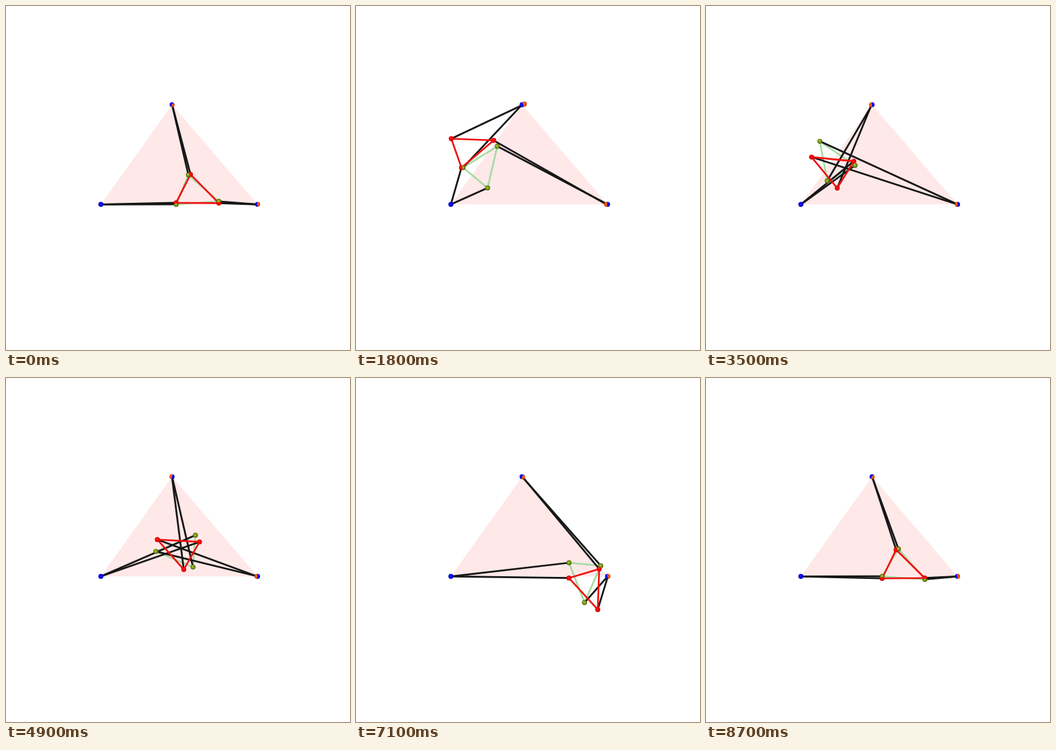
An HTML page with a canvas that plays this animation: 512 px wide and 512 px high, repeating every 8800 ms.

```html
<!DOCTYPE html>
<html lang="en">
<head>
<meta charset="utf-8">
<title>Closest singular pose of a planar manipulator</title>
<style>
  html, body { margin: 0; width: 100%; height: 100%; overflow: hidden; background: #fff; }
  canvas { display: block; }
</style>
</head>
<body>
<canvas id="stage" width="512" height="512"></canvas>
<script>
const ctx = document.getElementById('stage').getContext('2d');

const FRAMES = 88, FRAME_MS = 100;
const SCALE = 21.2, ORIGIN = [141.2, 295.3], BALL = 3.7;
const BASE = [[0, 0], [11, 0], [5, 7]];
const PLATFORM = [[0, 0], [3, 0], [1, 2]];
// Points 0-2 are the base, 3-5 the platform; edges: base, platform, legs.
const EDGES = [[0, 1], [1, 2], [2, 0], [3, 4], [4, 5], [5, 3], [0, 3], [1, 4], [2, 5]];
// Unknown number of each coordinate; the first base point and the base direction are fixed.
const SLOT = [-1, -1, 0, -1, 1, 2, 3, 4, 5, 6, 7, 8];
const POISSON = 0.5;

const dot = (a, b) => a[0] * b[0] + a[1] * b[1];
const sub = (a, b) => [a[0] - b[0], a[1] - b[1]];
const cross = (a, b) => a[0] * b[1] - a[1] * b[0];
const largest = values => Math.max(...values.map(Math.abs));
const gap = (a, b) => Math.hypot(...a.map((v, i) => v - b[i]));
const rotate = ([x, y], angle) => {
  const c = Math.cos(angle), s = Math.sin(angle);
  return [c * x - s * y, s * x + c * y];
};
const point = (coords, i) => [coords[2 * i], coords[2 * i + 1]];
const assemble = (position, angle) => [
  ...BASE,
  ...PLATFORM.map(m => { const r = rotate(m, angle); return [position[0] + r[0], position[1] + r[1]]; })
].flat();

// Elastic energy of a triangular plate as a quadratic form in its squared side changes.
function plateStiffness(triangle) {
  const e = triangle.map((p, i) => sub(triangle[(i + 1) % 3], p));
  const area = Math.abs(cross(e[0], e[1])) / 2;
  const factor = 1 / (64 * area ** 3 * (1 - POISSON ** 2));
  const d = (i, j) => dot(e[i % 3], e[j % 3]);
  return [0, 1, 2].map(a => [0, 1, 2].map(b => factor * (
    POISSON * d(a + 1, a + 2) * d(b + 1, b + 2) +
    (1 - POISSON) / 2 * (d(a + 1, b + 1) * d(a + 2, b + 2) + d(a + 1, b + 2) * d(a + 2, b + 1)))));
}
const PLATES = [plateStiffness(BASE), plateStiffness(PLATFORM)];

const squaredLengths = coords => EDGES.map(([a, b]) => {
  const d = sub(point(coords, a), point(coords, b));
  return dot(d, d);
});

function elasticModel(pose) {
  const restSq = squaredLengths(pose), couplings = [];
  PLATES.forEach((plate, n) => plate.forEach((row, i) =>
    row.forEach((k, j) => couplings.push([3 * n + i, 3 * n + j, k]))));
  for (let e = 6; e < 9; e++) couplings.push([e, e, 1 / (4 * restSq[e] ** 1.5)]);
  return { restSq, couplings };
}

function strain(coords, { restSq, couplings }) {
  const change = squaredLengths(coords).map((l, i) => l - restSq[i]);
  const stress = new Array(9).fill(0);
  let energy = 0;
  for (const [i, j, k] of couplings) {
    stress[i] += k * change[j];
    energy += k * change[i] * change[j] / 2;
  }
  return { stress, energy };
}

// Second derivatives of the energy, augmented with the downhill force;
// withStress = 0 leaves only the positive material part.
function linearSystem(coords, model, stress, withStress) {
  const matrix = Array.from({ length: 9 }, () => new Float64Array(10));
  const add = (i, j, v) => {
    if (SLOT[i] >= 0 && SLOT[j] >= 0) matrix[SLOT[i]][SLOT[j]] += v;
  };
  const gradients = EDGES.map(([a, b], e) => {
    const entries = [];
    for (let axis = 0; axis < 2; axis++) {
      const i = 2 * a + axis, j = 2 * b + axis;
      const g = 2 * (coords[i] - coords[j]), w = 2 * stress[e] * withStress;
      entries.push([i, g], [j, -g]);
      add(i, i, w); add(j, j, w); add(i, j, -w); add(j, i, -w);
    }
    for (const [i, g] of entries) if (SLOT[i] >= 0) matrix[SLOT[i]][9] -= stress[e] * g;
    return entries;
  });
  for (const [e, f, k] of model.couplings)
    for (const [i, gi] of gradients[e])
      for (const [j, gj] of gradients[f]) add(i, j, k * gi * gj);
  return matrix;
}

// Gaussian elimination on an augmented matrix.
function solve(m) {
  const n = m.length;
  for (let c = 0; c < n; c++) {
    let best = c;
    for (let r = c + 1; r < n; r++) if (Math.abs(m[r][c]) > Math.abs(m[best][c])) best = r;
    [m[c], m[best]] = [m[best], m[c]];
    for (let r = c + 1; r < n; r++) {
      const f = m[r][c] / m[c][c];
      for (let k = c; k <= n; k++) m[r][k] -= f * m[c][k];
    }
  }
  const x = new Array(n);
  for (let r = n - 1; r >= 0; r--) {
    let v = m[r][n];
    for (let k = r + 1; k < n; k++) v -= m[r][k] * x[k];
    x[r] = v / m[r][r];
  }
  return x;
}

const moved = (coords, move, limit) => {
  const factor = Math.min(1, limit / largest(move));
  return coords.map((v, i) => SLOT[i] < 0 ? v : v + factor * move[SLOT[i]]);
};

// Newton's method towards a stationary point of the elastic energy.
function findEquilibrium(start, model) {
  let coords = start;
  for (let step = 0; step < 45; step++) {
    const { stress, energy } = strain(coords, model);
    const move = solve(linearSystem(coords, model, stress, 1)), size = largest(move);
    if (!Number.isFinite(size)) return null;
    if (size < 1e-9) return { coords, energy };
    coords = moved(coords, move, 0.6);
  }
  return null;
}

// Does relaxing the strained pose, nudged to either side, lead back to the unstrained one?
function snapsBack(strained, pose, model) {
  const reach = gap(strained, pose);
  return [0.01, -0.01].some(nudge => {
    let coords = strained.map((v, i) => v + nudge * (pose[i] - v));
    let state = strain(coords, model), damping = 0.01;
    for (let step = 0; step < 500; step++) {
      if (gap(coords, pose) < 0.05 * reach) return true;
      const system = linearSystem(coords, model, state.stress, 0);
      system.forEach((row, i) => { row[i] += damping; });
      const move = solve(system);
      const next = moved(coords, move, 0.05 * reach), nextState = strain(next, model);
      if (nextState.energy < state.energy) {
        coords = next;
        state = nextState;
        damping = Math.max(damping / 2, 1e-7);
      } else {
        damping *= 4;
        if (damping > 1e6) return false;
      }
    }
    return false;
  });
}

function circleIntersections(p, r, q, s) {
  const d = sub(q, p), dist = Math.hypot(...d);
  const along = (dist * dist + r * r - s * s) / (2 * dist);
  const heightSq = r * r - along * along;
  if (!(heightSq >= 0)) return [];
  const h = Math.sqrt(heightSq), u = [d[0] / dist, d[1] / dist];
  return [h, -h].map(k => [p[0] + along * u[0] - k * u[1], p[1] + along * u[1] + k * u[0]]);
}

// Poses of the rigid platform at one angle in which two of the legs fit exactly.
function startPoses(angle, legs) {
  const centres = PLATFORM.map((m, i) => sub(BASE[i], rotate(m, angle)));
  return [0, 1, 2].flatMap(i => {
    const j = (i + 1) % 3;
    return circleIntersections(centres[i], legs[i], centres[j], legs[j]);
  }).map(position => assemble(position, angle));
}

const isUpright = coords => {
  const [, , c, l, r, t] = [0, 1, 2, 3, 4, 5].map(i => point(coords, i));
  return c[1] > 0 && cross(sub(r, l), sub(t, l)) > 0;
};

// The lowest energy pass leading out of the given pose is its closest singular pose.
function closestSingular(pose, angle) {
  const model = elasticModel(pose);
  const legs = model.restSq.slice(6).map(Math.sqrt);
  const found = [];
  for (let offset = 0.1; offset < 180; offset *= 1.2) {
    for (const side of [1, -1]) {
      for (const start of startPoses(angle + side * offset * Math.PI / 180, legs)) {
        const pass = findEquilibrium(start, model);
        if (pass && pass.energy > 1e-17 && isUpright(pass.coords)) found.push(pass);
      }
    }
  }
  found.sort((a, b) => a.energy - b.energy);
  const passes = found.filter((p, i) => !i || p.energy > found[i - 1].energy * (1 + 1e-6));
  return (passes.find(p => snapsBack(p.coords, pose, model)) || passes[0] || { coords: pose }).coords;
}

const cache = [];
function configuration(index) {
  if (!cache[index]) {
    const angle = (index + 1) * 2 * Math.PI / (FRAMES + 1);
    const pose = assemble([5.5 - 3 * Math.sin(angle), 1.5 - 1.5 * Math.cos(angle)], angle);
    const toScreen = coords => [0, 1, 2, 3, 4, 5].map(i =>
      [ORIGIN[0] + SCALE * coords[2 * i], ORIGIN[1] - SCALE * coords[2 * i + 1]]);
    cache[index] = { given: toScreen(pose), singular: toScreen(closestSingular(pose, angle)) };
  }
  return cache[index];
}

function line(a, b, colour, width) {
  ctx.strokeStyle = colour;
  ctx.lineWidth = width;
  ctx.beginPath();
  ctx.moveTo(...a);
  ctx.lineTo(...b);
  ctx.stroke();
}

// Equal balls at the same depth meet along the line halfway between their centres.
function drawBall(ball, all) {
  const [x, y] = ball.at;
  ctx.save();
  for (const other of all) {
    const [dx, dy] = sub(other.at, ball.at), dist = Math.hypot(dx, dy);
    if (other === ball || dist === 0 || dist > 2 * BALL) continue;
    ctx.translate(x + dx / 2, y + dy / 2);
    ctx.rotate(Math.atan2(dy, dx));
    ctx.beginPath();
    ctx.rect(-50, -50, 50, 100);
    ctx.setTransform(1, 0, 0, 1, 0, 0);
    ctx.clip();
  }
  const shade = ctx.createRadialGradient(x - 0.8, y - 0.8, 0, x, y, BALL);
  ball.shades.forEach((c, i) => shade.addColorStop([0, 0.55, 1][i], c));
  ctx.fillStyle = shade;
  ctx.beginPath();
  ctx.arc(x, y, BALL, 0, 2 * Math.PI);
  ctx.fill();
  ctx.restore();
}

const BLUE = ['#2020ff', '#0000f4', '#0000b8'];
const ORANGE = ['#ff6a1a', '#fa5000', '#c03c00'];
const GREEN = ['#b0cc38', '#7c9c14', '#455c08'];
const RED = ['#ff2020', '#fa0000', '#c80000'];

function draw(index) {
  const { given, singular } = configuration(index);
  ctx.clearRect(0, 0, 512, 512);

  ctx.fillStyle = '#ffe8e8';
  ctx.beginPath();
  given.slice(0, 3).forEach(p => ctx.lineTo(...p));
  ctx.fill();

  const triangle = (p, colour) =>
    EDGES.slice(3, 6).forEach(([a, b]) => line(p[a], p[b], colour, 2.6));
  const legs = p => EDGES.slice(6).forEach(([a, b]) => line(p[a], p[b], '#161616', 2.7));
  triangle(given, '#a2dca2');
  legs(given);
  legs(singular);
  triangle(singular, '#f01010');

  const balls = (points, shades) => points.map(at => ({ at, shades }));
  const all = [
    ...balls(given.slice(0, 3), BLUE), ...balls(singular.slice(1, 3), ORANGE),
    ...balls(given.slice(3), GREEN), ...balls(singular.slice(3), RED)
  ];
  all.forEach(ball => drawBall(ball, all));
}

let shown = -1;
function tick() {
  const index = Math.floor(performance.now() / FRAME_MS) % FRAMES;
  if (index !== shown) draw(shown = index);
  requestAnimationFrame(tick);
}
tick();
</script>
</body>
</html>
```
